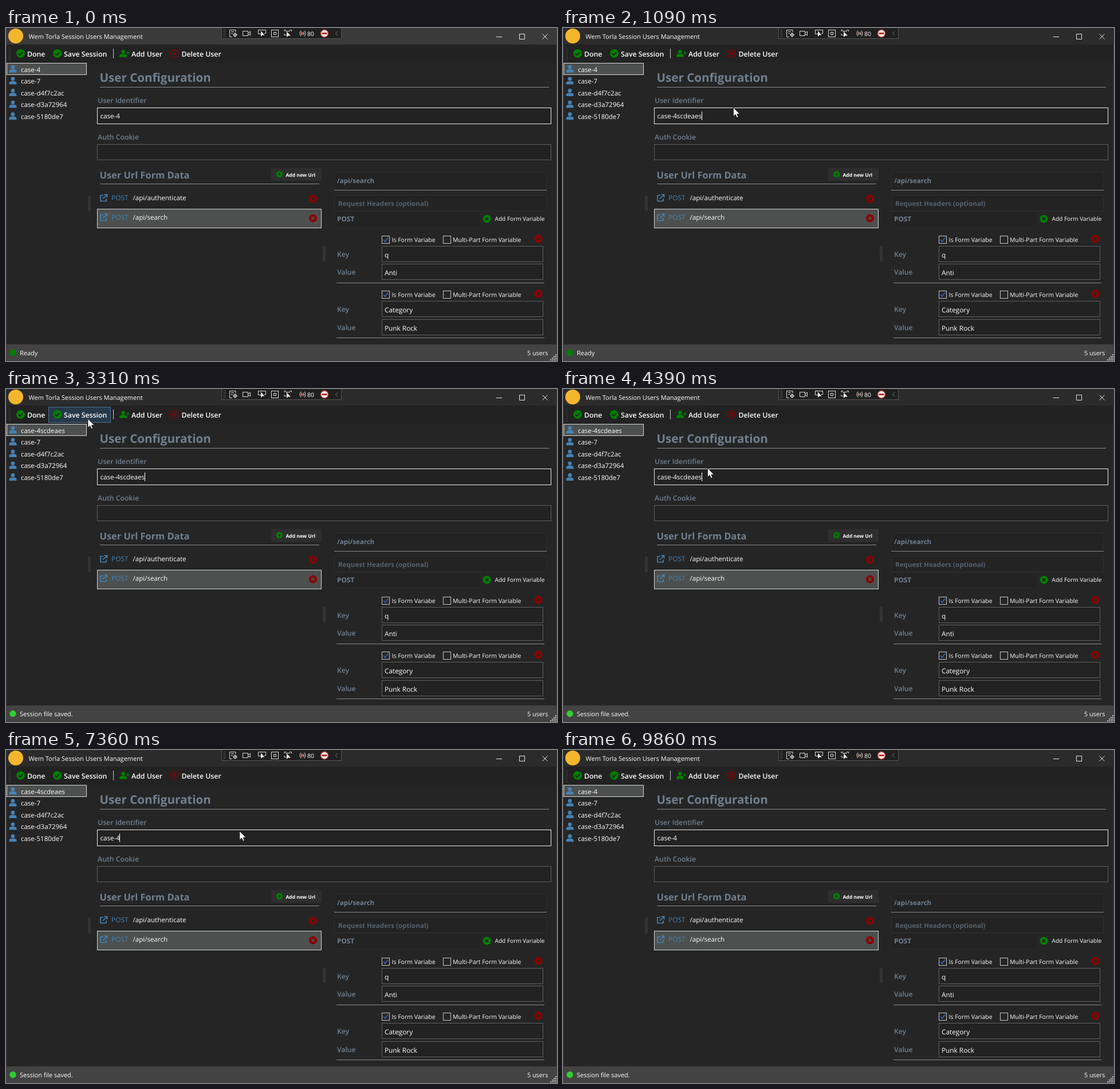
Write an HTML page that moves like this. It is 962 px wide and 582 px high and loops after 10 s.

```html
<!DOCTYPE html>
<html lang="en">
<head>
<meta charset="utf-8">
<title>Session Users</title>
<style>
html, body { margin: 0; height: 100%; overflow: hidden; background: #252525; }
svg { display: block; width: 100vw; height: 100vh; }
text { font-family: "Open Sans", "Noto Sans", sans-serif; text-rendering: geometricPrecision; white-space: pre; }
</style>
</head>
<body>
<svg id="stage" viewBox="0 0 962 582"></svg>
<script>
const LOOP = 10000, NAME = "case-4", TYPED = "scdeaes";
const SLATE = "#708090", STEEL = "#4682b4", GREEN = "#008000", RED = "#8b0000", WHITE = "#fff";
const BACK = "#252525", PICKED = "#4d504f";

// Markup helpers
const rect = (x, y, w, h, fill, stroke = "none", more = "") =>
  `<rect x="${x}" y="${y}" width="${w}" height="${h}" fill="${fill}" stroke="${stroke}" ${more}/>`;
const frame = (x, y, w, h, stroke, fill = "none") => rect(x + .5, y + .5, w - 1, h - 1, fill, stroke);
const text = (x, y, size, str, fill = WHITE, weight = 400, more = "") =>
  `<text x="${x}" y="${y}" font-size="${size}" fill="${fill}" font-weight="${weight}" ${more}>${str}</text>`;
const line = (d, stroke, width = 1, more = "") =>
  `<path d="${d}" fill="none" stroke="${stroke}" stroke-width="${width}" ${more}/>`;
const shape = (d, fill) => `<path d="${d}" fill="${fill}"/>`;
const disc = (x, y, r, fill, more = "") => `<circle cx="${x}" cy="${y}" r="${r}" fill="${fill}" ${more}/>`;
const at = (x, y, body) => `<g transform="translate(${x} ${y})">${body}</g>`;

// Icons
const check = (x, y) => at(x, y, disc(0, 0, 7.5, GREEN) + line("M-3.8 .2L-1.2 2.8 3.8-2.3", BACK, 2));
const cross = (x, y, fill, mark = BACK) =>
  at(x, y, disc(0, 0, 7, fill) + line("M-2.5-2.5L2.5 2.5M2.5-2.5L-2.5 2.5", mark, 1.8));
const person = (x, y, fill) => at(x, y, disc(0, -3.2, 3.4, fill) +
  shape("M-6.5 6.3V4.5Q-6.5 1.2-3 .8H3Q6.5 1.2 6.5 4.5V6.3Z", fill));
const link = y => at(164, y, line("M6 2.5H1V12.5H11V8M7.5 1H12.5V6M12.5 1L5 8.5", STEEL, 1.7));
const checkbox = (x, y, on) => frame(x, y, 14, 14, "#c8c8c8") +
  (on ? line(`M${x + 3} ${y + 7}l3 3.3 5-7`, "#3a62c8", 1.6) : "");

function titleBar() {
  const grip = [3, 6, 9, 12, 15].map(y => rect(380, y, 1, 1, "#888") + rect(382, y - 1, 1, 1, "#888")).join("");
  const icons = line("M401 7V3.5H390.5V15.5H395M393 6.5H398M393 9.5H396M400 8V16M396 12H404", "#ddd") +
    disc(400, 12, 2.7, "none", 'stroke="#ddd"') +
    line("M413.5 5.5H422.5V13.5H413.5ZM423 8.5L426.5 6V13L423 10.5", "#ddd") +
    line("M445 10.5H440.5V3.5H453.5V9.5H451", "#ddd") + shape("M445 5V15L447.5 12.5H451.5Z", "#eee") +
    frame(463, 3, 13, 13, "#ddd") + frame(467, 7, 5, 5, "#ddd") +
    line("M486 6V3.5H489M495 3.5H498.5V6M486 10V12.5H489M488 5.5H496", "#ddd") +
    shape("M490 6V16L492.5 13.5H497Z", "#eee") +
    line("M515 4.5Q511 9.5 515 14.5M521 4.5Q525 9.5 521 14.5M516.5 6.5Q514.5 9.5 516.5 12.5M519.5 6.5Q521.5 9.5 519.5 12.5", "#ddd") +
    disc(518, 9.5, 1.8, "#e05545") + text(526, 13.5, 10.5, "80") +
    disc(556, 9.5, 6.5, "#eee", 'stroke="#c0463c" stroke-width="1.4"') + rect(551.5, 8, 9, 3, "#b8352c") +
    line("M579 6L575 9.5 579 13", "#777");
  return rect(0, 0, 962, 29, "#2b2b2b", "none", 'id="caption"') + disc(17, 14, 13, "#f4b62c") +
    text(39.5, 19, 11, "Wem Torla Session Users Management") +
    frame(376, -1, 210, 20, "#555", "#1f1f1f") + grip + icons +
    line("M856 15.5H866M896.5 10.5H905.5V19.5H896.5ZM936.5 10.5L945.5 19.5M945.5 10.5L936.5 19.5", "#e8e8e8");
}

function toolBar() {
  let grip = "";
  for (let y = 34; y < 57; y += 4) grip += rect(5, y, 1, 1, "#666") + rect(7, y + 2, 1, 1, "#666");
  const label = (x, str) => text(x, 49.5, 12.3, str, WHITE, 600);
  return rect(0, 29, 962, 32, "#222") + grip +
    `<g id="hover">${frame(74, 31, 109, 28, "#4d7192", "#26394a")}</g>` +
    check(25.5, 44.5) + label(37, "Done") + check(89.5, 44.5) + label(101, "Save Session") +
    rect(187, 36, 1, 17, "#ccc") +
    person(204.5, 44.5, GREEN) + line("M210 43.5H215.5M212.8 40.8V46.2", GREEN, 1.6) +
    label(219, "Add User") +
    at(294, 44.5, disc(0, 0, 6.6, "none", `stroke="${RED}" stroke-width="1.5"`) +
      line("M-2.5-2.5L2.5 2.5M2.5-2.5L-2.5 2.5", RED, 1.7)) + label(306.5, "Delete User");
}

function userList() {
  const names = [NAME, "case-7", "case-d4f7c2ac", "case-d3a72964", "case-5180de7"];
  return frame(1, 61, 140, 21, "#d8d8d8", PICKED) + names.map((name, i) =>
    person(12, 71.5 + i * 20.6, STEEL) +
    text(26, 76.5 + i * 20.6, 11.5, name, WHITE, 500, i ? "" : 'id="listName"')).join("");
}

function mainForm() {
  const row = (y, path) => link(y - 11) + text(184, y, 11.9, "POST", STEEL) + text(221.5, y, 11.6, path);
  return text(163.5, 93.5, 20.6, "User Configuration", SLATE, 700) + rect(164, 103, 784, 1, "#8c8c8c") +
    text(160, 131, 12.3, "User Identifier", SLATE, 600) + frame(159, 139, 793, 29, "#f0f0f0", "#222") +
    text(164.5, 158, 11.6, NAME, WHITE, 400, 'id="field"') +
    rect(204, 145, 38, 17, "#0078d7", "none", 'id="mark" opacity=".3"') + rect(0, 146, 1, 15, WHITE, "none", 'id="caret"') +
    text(160, 194.5, 12.3, "Auth Cookie", SLATE, 600) + frame(159, 203, 793, 28, "#606060", "#222") +
    text(163.5, 263, 16.4, "User Url Form Data", SLATE, 700) + rect(164, 272, 383, 1, "#8c8c8c") +
    rect(463, 245, 88, 22, "#2e2e2e", "none", 'rx="1"') +
    disc(477.5, 255.5, 5.5, GREEN) + line("M474.5 255.5H480.5M477.5 252.5V258.5", "#2e2e2e", 1.4) +
    text(488.5, 259.5, 8.5, "Add new Url", WHITE, 700) +
    row(301, "/api/authenticate") + cross(536, 298.5, RED) +
    frame(159, 316, 392, 34, "#d8d8d8", PICKED) + row(335, "/api/search") + cross(536, 332.5, RED, PICKED) +
    rect(143, 293, 5, 27, "#333") + rect(553, 381, 5, 26, "#333");
}

function variable(y, key, value, drop) {
  const field = (y, name, str) => text(578, y + 18.5, 12.2, name, SLATE, 600) +
    frame(656, y, 282, 28, "#606060", "#222") + text(661, y + 19.5, 11.8, str);
  return at(0, y, checkbox(656, 363, true) + text(673.5, 374, 10.5, "Is Form Variabe") +
    checkbox(763, 363) + text(780, 374, 10.5, "Multi-Part Form Variable") + cross(929.5, 368.5, RED) +
    field(381, "Key", key) + field(412 + drop, "Value", value) + rect(577, 445, 363, 1, "#8c8c8c"));
}

function details() {
  return frame(573, 251, 371, 33, "#2d2d2d", "#232323") + rect(573, 283, 371, 1, "#8c8c8c") +
    text(578, 271, 11.5, "/api/search", SLATE, 700) +
    frame(573, 292, 371, 28, "#2f2f2f", "#232323") + text(580, 311, 11.6, "Request Headers (optional)", "#56626e", 700) +
    frame(573, 320, 256, 28, "#2a2a2a", "#232323") + text(578, 338, 11.8, "POST", SLATE, 700) +
    cross(839.5, 333.5, GREEN) + text(853.5, 337, 10.1, "Add Form Variable") +
    variable(0, "q", "Anti", 0) + variable(96, "Category", "Punk Rock", 1);
}

function statusBar() {
  let grip = "";
  for (let i = 0; i < 4; i++)
    for (let j = 0; j <= i; j++) grip += rect(959 - j * 3, 570 + i * 3, 2, 2, "#bbb");
  return rect(0, 553, 962, 29, "#434343") + disc(12, 567.5, 5.7, GREEN, 'id="light"') +
    text(24, 571.5, 11, "Ready", WHITE, 400, 'id="status"') +
    text(910, 571.5, 10.8, "5 users") + grip;
}

const stage = document.getElementById("stage");
stage.innerHTML = rect(0, 0, 962, 582, BACK) + titleBar() + toolBar() + userList() + mainForm() + details() +
  statusBar() + line("M.5 29V581.5H961.5V29", "#404040") +
  `<circle id="press" r="11" fill="#f5dc00" opacity=".7"/>` +
  `<path id="pointer" d="M0 0V15.500L3.600 12.200 6 17.500 8.500 16.400 6.100 11.300H11Z" fill="#fff" stroke="#111" stroke-width=".8"/>`;

const ids = ["caption", "hover", "listName", "field", "mark", "caret", "light", "status", "press", "pointer"];
const el = Object.fromEntries(ids.map(id => [id, document.getElementById(id)]));

// Pointer stops: time, x, y
const path = [[70, 630, 468], [600, 297.5, 139], [1530, 297.5, 139], [2170, 143, 52], [3820, 143, 52],
  [4350, 254, 138], [4760, 204, 151], [5200, 204, 151], [5360, 408.5, 142], [7340, 408.5, 142],
  [8050, 163.5, 43.5], [8890, 163.5, 43.5], [9130, 635, 472]];
const blinks = [70, 1620, 2110, 2640, 3040, 3840, 4370, 5230, 6500, 7430, 7900, 8920, 9390, 9860];
const within = (t, a, b) => t >= a && t < b;
const show = (node, on) => node.setAttribute("visibility", on ? "visible" : "hidden");

function pointerAt(t) {
  const i = path.findIndex(p => p[0] > t);
  if (i < 1) return i ? path[path.length - 1].slice(1) : path[0].slice(1);
  const [t0, x0, y0] = path[i - 1], [t1, x1, y1] = path[i];
  const u = (t - t0) / (t1 - t0), e = u * u * (3 - 2 * u);
  return [x0 + (x1 - x0) * e, y0 + (y1 - y0) * e];
}

function typedCount(t) {
  if (t >= 6900) return 0;
  if (t >= 6500) return 1;
  return Math.max(0, Math.min(TYPED.length, Math.floor((t - 520) / 95) + 1));
}

function draw(t) {
  const [x, y] = pointerAt(t), saved = t >= 3180;
  el.caption.setAttribute("fill", t < 70 ? "#3a3a3a" : "#2b2b2b");
  el.pointer.setAttribute("transform", `translate(${x} ${y})`);
  show(el.pointer, within(t, 70, 9130) && !within(t, 4650, 5270));
  el.press.setAttribute("cx", x);
  el.press.setAttribute("cy", y);
  show(el.press, within(t, 3040, 3180) || within(t, 4770, 5300) || within(t, 8110, 8250));
  show(el.hover, within(x, 74, 183) && within(y, 31, 59));

  el.listName.textContent = within(t, 3180, 8250) ? NAME + TYPED : NAME;
  el.status.textContent = saved ? "Session file saved." : "Ready";
  el.light.setAttribute("fill", saved ? "#32cd32" : GREEN);

  el.field.textContent = NAME + TYPED.slice(0, typedCount(t));
  const end = 164.5 + el.field.getComputedTextLength();
  const pick = within(t, 4770, 6500) ? 164.5 + el.field.getSubStringLength(0, NAME.length + 1) : end;
  show(el.mark, within(t, 5230, 6500));
  el.mark.setAttribute("x", pick);
  el.mark.setAttribute("width", end - pick);
  el.caret.setAttribute("x", Math.round(pick - .5));
  show(el.caret, blinks.filter(b => b <= t).length % 2);
}

const start = performance.now();
function tick() {
  draw((performance.now() - start) % LOOP);
  requestAnimationFrame(tick);
}
tick();
</script>
</body>
</html>
```
